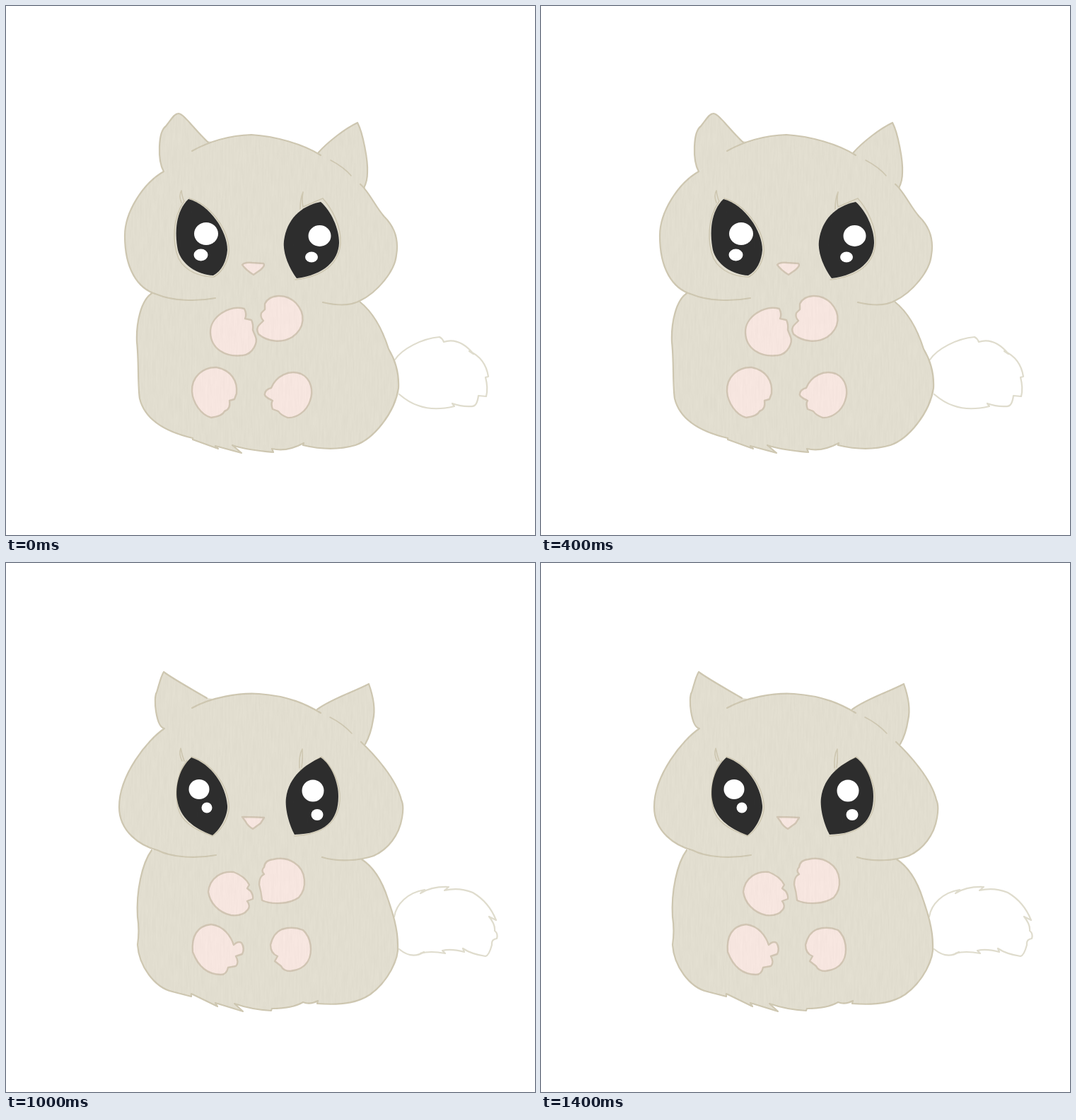
An HTML page that plays this animation: 748x748 px, repeating every 1600 ms.

```html
<!DOCTYPE html>
<html lang="en">
<head>
<meta charset="utf-8">
<title>Fluffy blink</title>
<style>
  html, body { margin: 0; width: 100%; height: 100%; overflow: hidden; background: #fff; }
  svg { display: block; width: 100%; height: 100%; }
  .fur { fill: #e4e0d2; stroke: #d0c9b3; stroke-width: 2.2; }
  .base { fill: #e4e0d2; }
  .line { fill: none; stroke: #d0c9b3; stroke-width: 1.6; }
  .tail { fill: none; stroke: #dfdccd; stroke-width: 2.2; }
  .pad { fill: #f9e8e2; stroke: #d3c7b5; stroke-width: 2.4; }
  .eye { fill: #2e2e2e; }
  .shine { fill: #fff; }
  path { stroke-linejoin: round; stroke-linecap: round; }
  .pose { opacity: 0; animation: 1.6s step-end infinite; }
  .low { animation-name: low; }
  .wide { animation-name: wide; }
  .shut { animation-name: shut; }
  @keyframes low {
    0%, 25%, 50% { opacity: 1; }
    12.5%, 37.5%, 62.5%, 100% { opacity: 0; }
  }
  @keyframes wide {
    0%, 25%, 50%, 75% { opacity: 0; }
    12.5%, 37.5%, 62.5%, 87.5%, 100% { opacity: 1; }
  }
  @keyframes shut {
    0%, 87.5%, 100% { opacity: 0; }
    75% { opacity: 1; }
  }
</style>
</head>
<body>
<svg viewBox="0 0 748 748">
  <defs>
    <filter id="grain" filterUnits="userSpaceOnUse" x="0" y="0" width="748" height="748" color-interpolation-filters="sRGB">
      <feTurbulence type="fractalNoise" baseFrequency=".4 .04" numOctaves="2" seed="4"/>
      <feColorMatrix values="0 0 0 0 0  0 0 0 0 0  0 0 0 0 0  .03 0 0 0 -.005"/>
      <feComposite operator="in" in2="SourceAlpha" result="fibre"/>
      <feMerge><feMergeNode in="SourceGraphic"/><feMergeNode in="fibre"/></feMerge>
    </filter>
    <path id="base" class="base" d="M223 234L263 205L284 191L446 209L508 254L500 420L208 408Z"/>
  </defs>

  <g class="pose low">
    <path class="tail" d="M550 500C560 485 588 470 613 468Q617 470 619 475Q641 468 661 492L655 488Q678 498 682 524L678 525Q682 540 679 552L668 551Q666 567 658 566Q645 567 631 562L634 566Q605 573 583 565Q570 561 556 549"/>
    <g filter="url(#grain)">
      <path class="fur" d="M208 405C190 415 184 450 185 475C188 500 186 535 189 555C197 588 230 603 264 611L264 613L300 626L296 622L333 632L320 621C340 628 360 629 378 631L376 626Q397 631 421 618L420 621C445 627 470 628 494 621C520 612 550 575 555 540C556 520 550 500 541 485C530 450 515 430 500 418"/>
      <use href="#base"/>
      <path class="fur" d="M223 234C214 218 215 178 226 170C234 160 238 152 244 152C252 153 264 172 286 193"/>
      <path class="fur" d="M441 208C455 192 480 173 497 165C505 180 512 220 511 235Q511 248 506 257"/>
      <path class="fur" d="M263 205C290 190 320 183 347 182C380 184 420 195 445 211"/>
      <path class="fur" d="M223 234C195 250 168 290 168 325C168 370 185 400 214 408C235 417 270 418 296 413"/>
      <path class="fur" d="M501 252C513 262 523 285 535 298C555 318 554 340 552 352C550 375 525 405 500 417C485 425 465 423 448 419"/>
      <path class="line" d="M459 218Q478 228 488 240"/>
      <path class="line" d="M248 278Q244 268 248 261Q249 270 252 276C235 300 235 335 244 357C254 376 275 383 294 383C308 375 317 355 315 340C312 312 287 280 259 272"/>
      <path class="line" d="M416 287Q416 272 420 263Q418 275 420 284L448 272C462 288 474 312 473 336C470 365 450 382 409 387"/>
      <path class="eye" d="M258 273C240 290 238 320 243 345C248 365 270 380 293 381C305 375 312 360 313 345C313 318 288 281 258 273Z"/>
      <path class="eye" d="M445 277C460 290 471 315 471 335C470 360 450 380 411 385C401 372 391 350 393 332C397 302 416 283 445 277Z"/>
      <path class="pad" d="M334 366Q337 362 348 363L364 364Q367 367 360 373L350 380Q340 374 334 366Z"/>
      <path class="pad" d="M337 428C315 422 288 440 289 462C290 485 310 497 335 494C350 492 356 475 353 468L349 458Q350 450 347 444L338 442Q341 436 337 428Z"/>
      <path class="pad" d="M366 421C372 408 395 405 410 420C424 435 423 455 405 468C390 477 370 475 357 464Q353 456 358 451L364 445Q359 440 361 434L366 429Z"/>
      <path class="pad" d="M263 545C262 525 278 510 298 511C318 515 328 530 326 548L323 556L316 558Q318 570 309 573Q306 580 290 582C275 578 264 560 263 545Z"/>
      <path class="pad" d="M375 540C382 523 400 514 417 520C432 527 435 545 430 558C425 574 410 583 398 582Q388 578 385 573L377 570Q374 562 377 558Q364 552 366 548Q367 542 375 540Z"/>
    </g>
    <g class="shine">
      <ellipse cx="283" cy="322" rx="17" ry="16"/>
      <ellipse cx="275.500" cy="352" rx="10" ry="8.500"/>
      <ellipse cx="443.500" cy="325" rx="16" ry="15"/>
      <ellipse cx="432" cy="355" rx="9" ry="7.500"/>
    </g>
  </g>

  <g class="pose wide">
    <path class="tail" d="M549 500C552 482 568 466 592 462L586 467Q602 457 626 458L620 463Q640 458 660 466C672 473 685 485 693 505L683 500Q692 511 691 520Q696 524 694 531Q686 532 687 540Q683 555 678 556Q658 553 646 545L648 550Q630 545 617 548L621 552Q600 548 586 552L591 550Q574 561 556 546"/>
    <g filter="url(#grain)">
      <path class="fur" d="M206 406C192 425 184 465 186 500Q189 520 186 540C188 570 210 600 235 606L262 613L262 609L299 627L296 622L335 634L323 623C340 629 358 632 375 633L376 630Q405 630 420 621Q430 625 441 619L440 623C480 626 500 620 515 610C540 592 556 560 554 540C554 515 545 490 540 475C532 450 520 430 503 419"/>
      <use href="#base"/>
      <path class="fur" d="M224 234C212 232 208 190 213 183C217 170 219 160 223 154C238 165 262 178 284 191"/>
      <path class="fur" d="M440 207C460 192 490 183 513 171C518 185 523 205 519 222Q516 242 508 256"/>
      <path class="fur" d="M263 205C290 190 330 183 358 185C400 188 425 200 445 212"/>
      <path class="fur" d="M224 234C200 250 160 300 160 345C160 380 190 400 214 406C235 417 270 418 297 413"/>
      <path class="fur" d="M502 253C520 270 552 305 559 335Q563 343 560 360C556 385 540 405 520 414C500 421 470 423 447 416"/>
      <path class="line" d="M458 218Q476 227 489 241"/>
      <path class="line" d="M249 280Q244 270 247 262Q249 272 252 280M256 279C239 300 238 335 246 354C254 371 275 380 292 386C308 375 317 355 315 340C312 312 289 282 262 274"/>
      <path class="line" d="M415 290Q414 272 419 263Q420 275 418 289M416 293L446 274C462 288 473 312 472 335C470 365 450 384 408 386"/>
      <path class="eye" d="M262 275C245 290 239 315 242 335C246 360 265 375 292 385C305 375 314 355 313 343C311 314 290 284 262 275Z"/>
      <path class="eye" d="M445 275C460 285 470 310 470 330C470 365 450 383 408 384C401 372 394 348 396 332C400 302 423 285 445 275Z"/>
      <path class="pad" d="M334 359Q345 359 365 360L360 368L349 376Q342 372 339 366Z"/>
      <path class="pad" d="M286 465C288 445 305 435 322 437Q338 443 344 455L341 460L346 464Q350 470 349 475L341 478Q346 485 342 490Q335 500 318 498C300 494 288 480 286 465Z"/>
      <path class="pad" d="M365 430Q366 420 378 419Q395 415 408 424C425 435 426 460 414 473C400 483 375 483 362 477Q361 465 358 455Q358 446 362 442L365 440Q360 435 365 430Z"/>
      <path class="pad" d="M264 550C262 528 270 513 290 511C308 513 318 528 322 540Q328 534 333 537Q338 545 334 553L325 556Q330 565 325 570L314 572Q312 582 304 582Q276 582 264 550Z"/>
      <path class="pad" d="M374 540Q378 523 390 518Q405 513 420 519C432 530 434 550 427 563Q420 575 402 577Q392 577 389 570L380 563L384 556Q374 552 374 540Z"/>
    </g>
    <g class="shine">
      <ellipse cx="273" cy="320" rx="14.500" ry="14"/>
      <circle cx="284" cy="346" r="7.500"/>
      <circle cx="434" cy="322" r="15.500"/>
      <ellipse cx="440" cy="356" rx="8.500" ry="8"/>
    </g>
  </g>

  <g class="pose shut">
    <path class="tail" d="M548 498Q568 473 597 465L589 470Q605 459 628 462L620 468Q640 462 665 475L652 478Q675 483 688 508L680 507Q688 522 691 541L685 542L690 549Q670 558 647 554L652 560Q630 555 608 560L612 562Q580 560 554 543"/>
    <g filter="url(#grain)">
      <path class="fur" d="M208 405C192 425 182 470 185 500Q187 520 185 540C192 570 225 605 261 617L260 612L299 628L296 624L335 635L319 621C345 636 370 640 405 626Q420 620 440 619L433 625C470 627 510 612 538 592Q548 575 547 570Q555 550 554 535C552 500 535 465 502 418"/>
      <use href="#base"/>
      <path class="fur" d="M227 235Q208 222 205 198Q207 178 212 167Q250 180 290 193"/>
      <path class="fur" d="M443 206Q485 193 524 189Q528 215 521 240Q515 252 508 256"/>
      <path class="fur" d="M265 206C290 188 320 183 346 184C385 184 425 195 446 213"/>
      <path class="fur" d="M227 234C195 260 168 295 168 335C168 375 190 398 212 404C235 414 270 418 296 415"/>
      <path class="fur" d="M503 253C525 275 552 315 554 345C550 375 525 405 502 418Q475 425 446 418"/>
      <path class="line" d="M248 267Q253 277 259 285Q256 275 260 272Q266 285 271 290C285 315 296 345 297 365L295 383L290 384C288 350 275 325 264 296Q246 285 248 267Z"/>
      <path class="line" d="M438 269Q437 280 439 286Q446 284 452 277Q455 284 446 295C438 320 425 350 412 384Q406 384 407 360C407 335 420 308 434 293Q433 278 438 269Z"/>
      <path class="pad" d="M334 358L361 358L356 367L346 376L339 367Z"/>
      <path class="pad" d="M287 462C289 445 305 433 330 434L333 443L347 447Q345 455 344 460L353 467Q348 472 349 480C340 495 320 498 308 491Q288 478 287 462Z"/>
      <path class="pad" d="M357 432Q365 417 387 414C410 414 421 428 420 445C417 468 395 483 376 482L362 477Q366 470 356 463L361 460L361 448Q353 443 357 432Z"/>
      <path class="pad" d="M262 540C262 522 275 511 293 511C312 514 325 527 327 542L322 550L318 560L311 566Q304 578 290 580C272 574 262 558 262 540Z"/>
      <path class="pad" d="M375 541Q382 522 400 517C420 515 437 530 437 550Q433 570 416 577L408 581L395 581Q382 576 381 571L384 569L375 563Q376 557 363 550Q362 541 375 541Z"/>
    </g>
  </g>
</svg>
</body>
</html>
```
